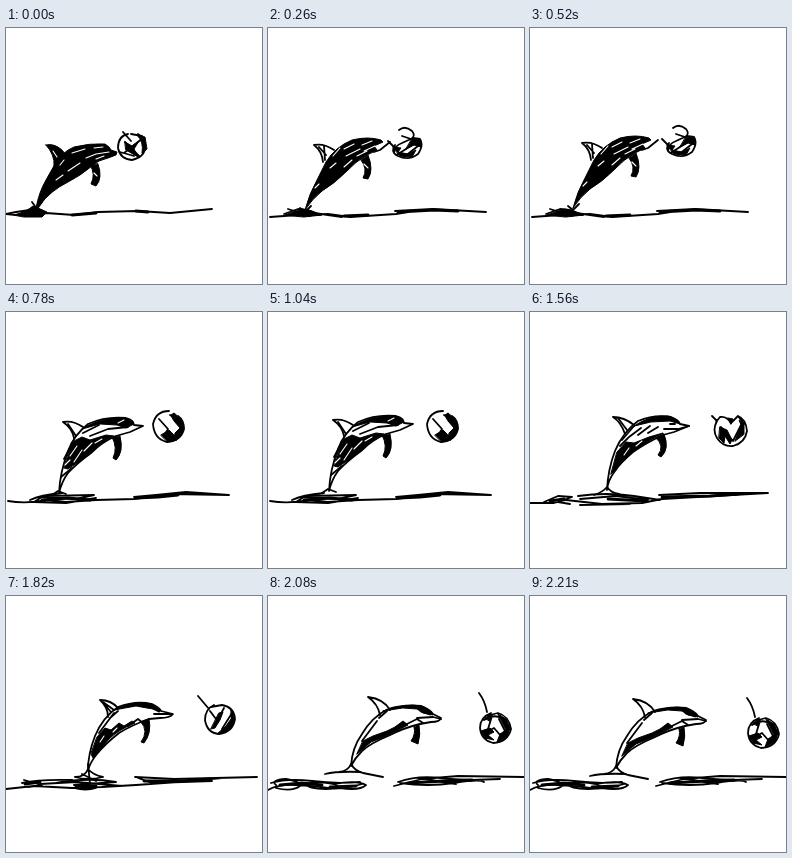
An HTML page without scripts that plays this animation: 256x256 px, repeating every 2.34 s.

```html
<!DOCTYPE html>
<html lang="en">
<head>
<meta charset="utf-8">
<title>Dolphin and ball</title>
<style>
html, body { margin: 0; width: 100%; height: 100%; overflow: hidden; background: #fff; }
svg { display: block; width: 100%; height: 100%; }
path { fill: none; stroke: #000; stroke-width: 1.8; stroke-linecap: round; stroke-linejoin: round; }
.k { fill: #000; stroke-width: 1; }
.o { fill: #fff; }
.w { stroke: #fff; stroke-width: 1.1; }
.b { stroke-width: 2.8; }

/* every drawing is held on a 130 ms beat, 18 beats per loop */
.swim { animation: swim 2340ms infinite; }
.toss { animation: toss 2340ms infinite; }
@keyframes swim {
  0% { transform: translate(0, 0); animation-timing-function: steps(4); }
  22.222% { transform: translate(12px, -4px); animation-timing-function: steps(4); }
  44.444% { transform: translate(28px, -8px); animation-timing-function: steps(2); }
  55.555% { transform: translate(40px, -8px); animation-timing-function: steps(2); }
  66.666% { transform: translate(46px, -8px); animation-timing-function: steps(2); }
  77.777% { transform: translate(54px, -8px); animation-timing-function: steps(3); }
  94.444%, 100% { transform: translate(63px, -2px); }
}
@keyframes toss {
  0% { transform: translate(126px, 119px); animation-timing-function: steps(4); }
  22.222% { transform: translate(150px, 115px); animation-timing-function: steps(4); }
  44.444% { transform: translate(174px, 115px); animation-timing-function: steps(2); }
  55.555% { transform: translate(188px, 117px); animation-timing-function: steps(2); }
  66.666% { transform: translate(202px, 119px); animation-timing-function: steps(2); }
  77.777% { transform: translate(214px, 123px); animation-timing-function: steps(3); }
  94.444%, 100% { transform: translate(232px, 138px); }
}

.pose { visibility: hidden; animation: 2340ms step-end infinite; }
.leap { animation-name: leap; }
.rise { animation-name: rise; }
.lift { animation-name: lift; }
.peak { animation-name: peak; }
.hang { animation-name: hang; }
.lean { animation-name: lean; }
.dive { animation-name: dive; }
@keyframes leap { 0% { visibility: visible; } 11.111%, 100% { visibility: hidden; } }
@keyframes rise { 0% { visibility: hidden; } 11.111% { visibility: visible; } 33.333%, 100% { visibility: hidden; } }
@keyframes lift { 0% { visibility: hidden; } 33.333% { visibility: visible; } 50%, 100% { visibility: hidden; } }
@keyframes peak { 0% { visibility: hidden; } 50% { visibility: visible; } 61.111%, 100% { visibility: hidden; } }
@keyframes hang { 0% { visibility: hidden; } 61.111% { visibility: visible; } 72.222%, 100% { visibility: hidden; } }
@keyframes lean { 0% { visibility: hidden; } 72.222% { visibility: visible; } 88.888%, 100% { visibility: hidden; } }
@keyframes dive { 0% { visibility: hidden; } 88.888%, 100% { visibility: visible; } }
</style>
</head>
<body>
<svg viewBox="0 0 256 256">
  <!-- water line -->
  <g class="pose leap">
    <path d="M0 186L10 187 40 185 68 187 92 184 132 183 164 185 206 181M0 186L10 184 24 182"/>
    <path class="k" d="M8 187Q20 184 27 178L32 180 41 184 36 189 18 189Z"/>
    <path class="b" d="M66 187L90 185M130 183L142 184"/>
  </g>
  <g class="pose rise">
    <path d="M2 189L30 187 60 186 82 189 128 186 140 184M127 183L165 181 218 184M16 186L30 181 40 182 52 187 24 186M20 181L42 188M46 185L74 189"/>
    <path class="k" d="M17 187L34 181 44 183 54 187 36 189Z"/>
    <path class="b" d="M76 188L100 187M130 184L166 182 190 183"/>
  </g>
  <g class="pose lift">
    <path d="M2 189Q20 192 42 188L60 190 90 188 128 187 165 182 223 183M24 188Q34 183 56 181M40 184L88 183 70 187 36 185 28 190 60 191 90 186M128 185L150 183 180 180 223 183"/>
    <path class="b" d="M36 188L62 186 84 188M130 186L152 185 172 183"/>
  </g>
  <g class="pose peak">
    <path d="M3 190L44 189 78 193 106 189 130 186 180 184 235 182M18 189Q34 185 58 183L90 185 50 188 22 191M42 185L78 181 98 187 50 192M48 191Q76 194 100 190M134 183L175 181 235 182"/>
    <path class="b" d="M24 190L46 188M58 186L90 189M70 192L92 190M136 183L176 184 204 182"/>
  </g>
  <g class="pose hang">
    <path d="M0 191L24 191 36 188 72 192 112 191 132 187 238 181M14 190L28 184 42 185 28 190 40 192M48 184Q76 180 104 184L130 188M50 187L86 184 118 188M50 193L100 192M129 183L170 181 238 181"/>
    <path class="b" d="M20 189L34 187M78 187L116 189M132 185L180 184 208 182"/>
  </g>
  <g class="pose lean">
    <path d="M0 193L28 190 66 192 96 191 130 189 172 186 216 182M16 187Q34 183 66 184M18 184L36 189 22 191M34 188L70 186 116 190M50 187Q82 181 110 186L68 189M68 192Q80 195 90 192M129 181L168 183 251 181M132 182L146 187 206 185"/>
    <path class="b" d="M19 188L34 186M70 190L90 190M138 185L176 185 204 183"/>
  </g>
  <g class="pose dive">
    <path d="M0 194Q10 188 28 189T60 192T94 188M3 187Q20 182 44 185T92 186M8 189Q2 184 18 183Q34 186 32 190Q24 196 8 192M30 190Q46 184 66 188Q76 193 58 193T38 188M66 188Q88 184 98 189Q92 195 72 192M126 190L154 183 190 180 256 181M130 186Q150 179 172 182T232 183M132 187Q160 191 186 187T216 186M150 182L188 188"/>
    <path class="b" d="M12 189L34 187 54 189M62 191L88 190M140 187L176 185 204 184"/>
  </g>

  <!-- dolphin -->
  <g class="swim">
    <g class="pose leap">
      <path class="k" d="M30 180Q33 164 40 152L49 136Q56 124 68 119Q84 115 99 116Q104 119 105 122L111 124 110 127 102 130Q92 132 86 138Q74 148 62 154Q44 163 34 177Z"/>
      <path class="k" d="M40 117Q48 115 56 122L60 127 48 138Q49 127 40 117ZM84 137Q90 146 85 156L90 158Q97 150 92 136Z"/>
      <path d="M26 174L31 181 36 174"/>
      <path class="w" d="M47 123L51 129M54 137L58 132M66 125L79 121M88 120L97 119M62 143L74 135M80 130L90 126 103 124M50 152L57 147M90 131L98 128M88 145L91 148"/>
    </g>
    <g class="pose rise" transform="translate(-12 4)">
      <path class="k" d="M43 180Q47 164 56 148L64 132Q73 117 90 110Q106 106 119 110L121 112 112 116 115 120 105 125Q93 132 85 141Q72 154 60 161Q50 169 43 180Z"/>
      <path d="M52 115Q62 113 72 120M52 115Q60 121 61 132M57 117L64 125M62 116L63 130M38 178L43 182 49 176M112 122L118 120 128 112"/>
      <path class="k" d="M99 130Q106 139 101 148L106 149Q112 140 106 125Z"/>
      <path class="w" d="M71 126L78 118M82 119L92 114M100 115L110 111M84 126L98 119M102 121L113 116M68 138L74 133M82 137L90 130M53 158L57 154M95 126L105 121M102 134L106 138"/>
    </g>
    <g class="pose lift" transform="translate(-28 8)">
      <path class="o" d="M61 179Q62 158 70 137Q76 121 90 110Q108 102 128 104Q136 106 136 111L145 112 132 118 118 122Q104 128 93 139Q78 150 70 159Q64 167 61 179Z"/>
      <path class="o" d="M65 108Q75 106 85 113M65 108Q74 114 76 124"/>
      <path class="k" d="M84 115Q98 106 116 104Q130 102 136 110L128 114 119 111 102 110ZM74 128L84 123 92 126 108 121 116 122Q102 129 92 140L70 155 66 154Z"/>
      <path class="k" d="M114 123Q120 134 115 144L118 146Q126 138 122 122Z"/>
      <path d="M54 181L60 177 68 180M85 119L101 111M92 122L110 115 130 113M70 110L78 122M63 163L74 154M66 145L74 130"/>
      <path class="w" d="M72 142L79 132M76 148L84 136M86 137L94 129M120 109L126 106M67 151L72 146M97 129L104 125"/>
    </g>
    <g class="pose peak" transform="translate(-40 8)">
      <path class="o" d="M70 176Q70 162 74 148Q77 128 89 117Q104 106 121 103Q136 102 142 108L154 112Q151 117 143 118L128 121Q112 128 100 137Q85 149 78 158Q73 167 70 176Z"/>
      <path class="o" d="M77 106Q82 105 86 108L93 107Q95 111 98 114M77 106Q84 113 84 122"/>
      <path class="k" d="M95 115Q110 105 124 103Q138 103 142 109L136 112 130 110 122 114 114 113 104 120 97 121ZM79 131Q82 120 90 117L98 121 92 129 102 126 108 122 118 120 128 121Q112 127 100 136L78 157Q74 150 79 131Z"/>
      <path class="k" d="M121 124Q128 134 122 144L126 144Q134 134 128 121Z"/>
      <path d="M60 180Q68 179 70 174Q76 179 84 180ZM126 116L144 115 154 112M81 107L88 117M86 108L91 116M101 124L116 115M110 122L128 114"/>
      <path class="w" d="M81 136L84 127M82 143L90 133M88 123L93 120M78 153L80 145M94 134L101 129M106 114L112 110M120 110L130 106M111 126L117 123"/>
    </g>
    <g class="pose hang" transform="translate(-46 8)">
      <path class="o" d="M77 178Q78 157 85 139Q93 120 108 109Q125 102 141 105Q149 108 150 112L159 114 144 120 133 123Q116 131 103 140Q90 151 85 159Q78 168 77 178Z"/>
      <path class="o" d="M83 105Q94 105 104 113M83 105Q91 110 95 122"/>
      <path class="k" d="M104 114Q120 103 138 104Q148 107 150 112L140 109 121 110ZM87 140L96 130 104 131 119 125 133 121Q116 130 103 140L81 162Z"/>
      <path class="k" d="M126 126Q135 134 128 143L131 145Q140 137 134 122Z"/>
      <path d="M64 183Q73 180 77 175Q81 181 89 182M92 128L104 114M99 125L111 116M108 123L120 114M90 134L98 126M134 117L148 117 159 114M88 106L97 118M140 112L145 112M118 121L128 115"/>
      <path class="w" d="M94 143L99 136M106 134L112 129"/>
    </g>
    <g class="pose lean" transform="translate(-54 8)">
      <path class="o" d="M82 174Q82 158 89 140Q97 121 112 111Q130 104 146 108Q153 111 155 115L167 118Q164 122 154 122L143 123Q126 129 113 137Q99 148 91 158Q85 165 82 174Z"/>
      <path class="o" d="M94 104Q105 104 112 112M94 104Q102 111 102 121M97 106L108 114M99 109L105 116"/>
      <path class="k" d="M108 114Q127 104 146 108L154 114 141 112 130 110 119 112ZM91 141L99 132 105 134 113 127 118 130 126 125 129 127Q112 134 103 143L87 162 85 158Z"/>
      <path class="k" d="M135 126Q143 135 135 146L138 147Q146 137 143 123Z"/>
      <path d="M69 181Q79 181 82 173Q87 179 97 181Q82 185 69 181M93 137L108 117M122 130L132 123 138 128M148 118L166 118M104 122L112 115M82 168L84 188M76 178L90 185"/>
      <path class="b" d="M147 112L153 115"/>
      <path class="w" d="M94 146L98 140M107 136L111 132"/>
    </g>
    <g class="pose dive" transform="translate(-63 2)">
      <path class="o" d="M86 172Q87 154 97 140Q107 123 123 115Q140 110 156 112Q165 115 168 120L176 124Q175 128 166 128L155 130Q138 134 123 142Q106 149 97 157Q90 164 86 172Z"/>
      <path class="o" d="M103 103Q119 105 125 116M103 103Q113 110 115 121"/>
      <path class="k" d="M118 117Q140 109 157 112Q166 116 168 121L158 119 152 115 138 114ZM98 147L108 142 122 137 130 133 138 127 143 131 121 142 106 148 92 160Z"/>
      <path class="k" d="M149 133Q151 140 146 147L153 150Q156 140 154 131Z"/>
      <path d="M74 178Q83 177 86 170Q90 177 98 179L118 183M60 180Q72 177 96 178M97 147L112 127M152 124L168 123 176 125M136 133L152 125 158 129M114 124L122 117"/>
      <path class="b" d="M156 117L165 120"/>
    </g>
  </g>

  <!-- ball -->
  <g class="toss">
    <g class="pose leap" transform="translate(-126 -119)">
      <path d="M122 106Q112 108 112 120Q114 131 126 132Q139 129 139 119Q139 110 132 106M117 104L125 113M114 124L128 128M118 125L137 110M119 114L133 128M125 106L136 108"/>
      <path class="k" d="M131 107L139 109 141 121 136 125Q138 114 131 107ZM119 114L126 118 133 113 128 121 132 129 120 122Z"/>
    </g>
    <g class="pose rise" transform="translate(-150 -115)">
      <path d="M143 100Q149 95 156 101Q160 106 155 109L146 106M132 111L140 119M139 115Q134 122 142 126Q153 131 162 124Q168 115 164 109L157 108 146 113Q138 116 138 123M142 124L158 114M148 127L162 116"/>
      <path class="k" d="M137 117L145 118 142 122 152 124 160 120 156 127 144 126ZM156 109L164 110 165 117 158 115 150 119Z"/>
    </g>
    <g class="pose lift" transform="translate(-174 -115)">
      <path d="M175 99Q162 99 159 112Q160 127 173 130Q187 129 190 117Q190 108 184 104M165 107L174 117 170 124M176 103L183 107"/>
      <path class="k" d="M177 103L180 101 187 107 190 116 186 125 180 128 181 121 186 116 180 109ZM167 123L175 118 179 122 183 128 174 130Z"/>
    </g>
    <g class="pose peak" transform="translate(-188 -117)">
      <path d="M180 101Q171 105 171 116Q173 130 187 132Q201 130 203 116Q202 104 190 101L182 103M181 97L184 114M196 105Q201 112 197 118"/>
      <path class="k" d="M198 107Q204 112 203 118Q200 130 187 132L179 129 184 126 188 122 190 126 195 117 199 116ZM173 118L178 122 183 130 176 127Z"/>
    </g>
    <g class="pose hang" transform="translate(-202 -119)">
      <path d="M182 104L187 109Q182 118 187 126Q193 135 203 134Q215 131 217 119Q216 107 208 104L201 111Q197 104 190 105L186 110M194 128L191 115 203 129 211 113M208 104L214 112"/>
      <path class="k" d="M190 115L197 118 202 128 200 132 195 124 194 131 189 126ZM205 129L211 113 209 108 214 112 214 122ZM198 106L203 107 201 112Z"/>
    </g>
    <g class="pose lean" transform="translate(-214 -123)">
      <path d="M192 100L203 113M208 109Q199 113 199 124Q201 137 213 138Q227 136 229 123Q228 111 216 109L205 111M204 115L210 123M218 112L208 131M226 117L216 133"/>
      <path class="k" d="M213 117L217 116 214 124 209 132 205 133ZM225 114Q230 122 226 130Q219 138 211 138L220 130 225 123Z"/>
    </g>
    <g class="pose dive" transform="translate(-232 -138)">
      <path d="M217 102Q223 110 225 121M229 122Q218 126 218 137Q219 149 231 152Q246 151 249 138Q247 125 236 122L224 125M222 129Q232 122 242 128M221 143L232 137 239 145M230 125L226 138M237 128L245 144"/>
      <path class="k" d="M236 123L244 128 248 137 245 146 235 151 238 143 244 139 240 131ZM219 140L228 137 232 141 226 144 232 149 223 147ZM223 127L229 124 228 130Z"/>
    </g>
  </g>
</svg>
</body>
</html>
```
